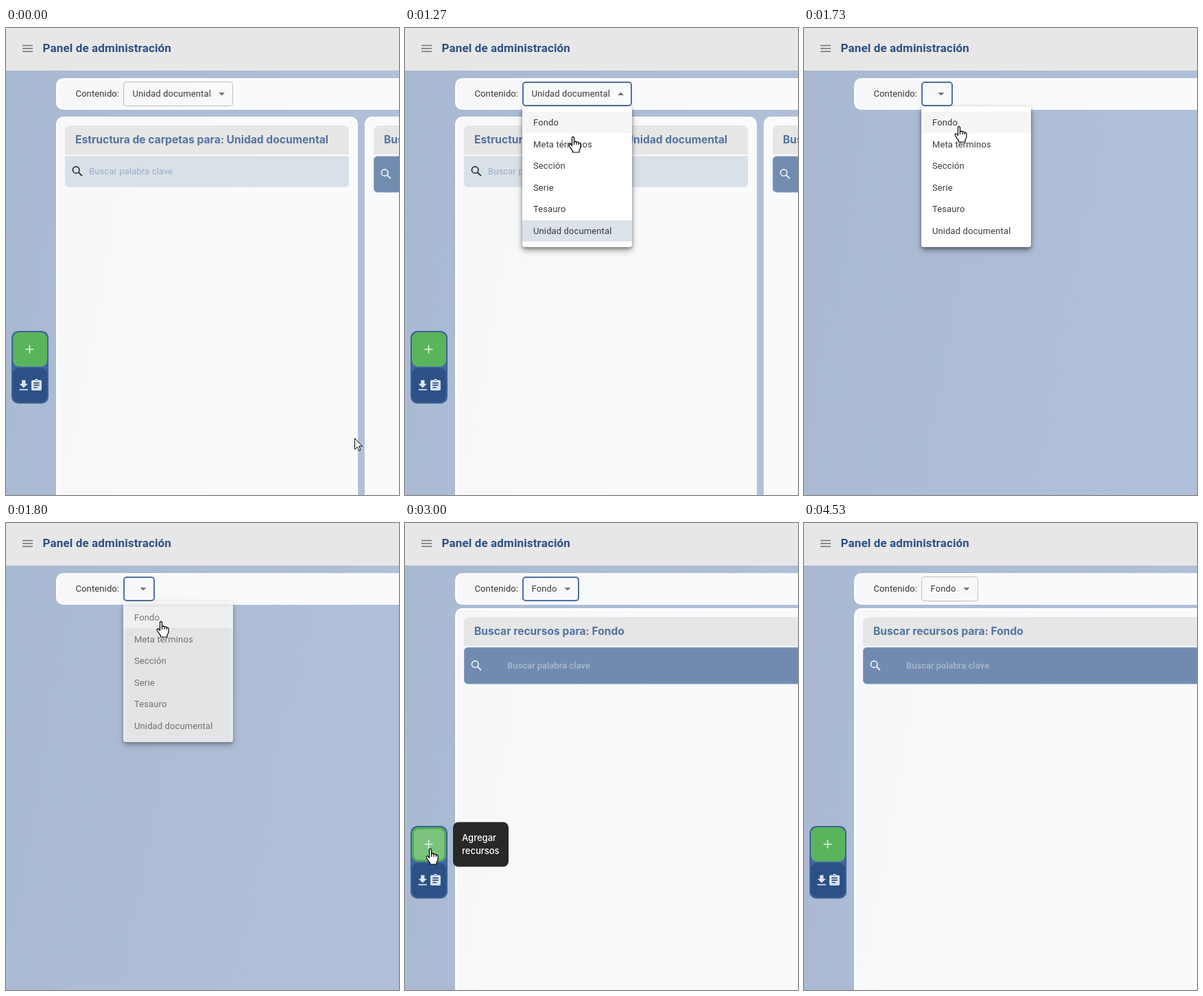
These frames come from a looping animation (573 by 680 pixels, 4870 ms). An HTML page with a canvas:

```html
<!DOCTYPE html>
<html lang="es">
<head>
<meta charset="utf-8">
<title>Panel de administración</title>
<style>
html, body { margin: 0; width: 573px; height: 680px; overflow: hidden; }
canvas { display: block; }
</style>
</head>
<body>
<canvas id="stage" width="573" height="680"></canvas>
<script>
const ctx = document.getElementById('stage').getContext('2d');
const W = 573, H = 680, LOOP = 4870, TICK = 1000 / 15;
const BLUE = '#4f719f', HEADING = '700 15.6px Inter, sans-serif', BODY = '13px Roboto, sans-serif';
const ITEMS = ['Fondo', 'Meta términos', 'Sección', 'Serie', 'Tesauro', 'Unidad documental'];
const ITEM_TOP = 122, ITEM_H = 31.5;

// Moments of the story, in ms
const HOVER_SELECT = 470, OPEN = 600, PICK = 1730, LOADED = 2000, HOVER_ADD = 2800, LEAVE_ADD = 4070, BLUR = 4530;

// Pointer: time, x, y
const TRAIL = [
  [0, 508, 597], [70, 500, 578], [200, 438, 430], [330, 340, 230], [470, 288, 116], [530, 283, 102],
  [1070, 283, 102], [1130, 278, 109], [1200, 262, 135], [1270, 245, 158], [1330, 240, 159],
  [1530, 226, 143], [1870, 226, 143], [2130, 200, 161], [2200, 172, 200], [2270, 132, 258],
  [2400, 86, 345], [2670, 44, 438], [2730, 41, 455], [2870, 38, 470], [3000, 37, 474],
  [3930, 37, 474], [4000, 36, 481], [4070, 42, 500], [4130, 62, 537], [4200, 98, 588],
  [4270, 145, 656], [4330, 180, 710]
];

const downloadIcon = new Path2D('M19 9h-4V3H9v6H5l7 7 7-7zM5 18v2h14v-2H5z');
const clipboardIcon = new Path2D('M19 3h-4.2C14.4 1.8 13.3 1 12 1s-2.4.8-2.8 2H5c-1.1 0-2 .9-2 2v14c0 1.1.9 2 2 2h14c1.1 0 2-.9 2-2V5c0-1.1-.9-2-2-2zm-7 0a1 1 0 0 1 0 2 1 1 0 0 1 0-2zm2 14H7v-2h7zm3-4H7v-2h10zm0-4H7V7h10z');
const arrowCursor = new Path2D('M.5 .5V16.5L4.2 13 6.8 18.6 9 17.6 6.6 12H11.5Z');
const handCursor = new Path2D('M-1.5 1.5Q0-.9 1.5 1.5V8Q3.6 6.4 5 8.2 7 7.2 8.3 9.2 11 8.6 11 11.5V15.5Q10.8 18 9 20V23H-.5V21Q-3 18-5.6 13.5-6.5 10.4-4 11-2.5 11.8-1.5 13.5Z');
const knuckles = new Path2D('M1.5 8V12M5 8.2V12M8.3 9.2V12');

const clamp = v => Math.max(0, Math.min(1, v));
const ease = v => 1 - (1 - clamp(v)) ** 2;

function sweep(x0, y0, x1, y1, from, to) {
  const g = ctx.createLinearGradient(x0, y0, x1, y1);
  g.addColorStop(0, from);
  g.addColorStop(1, to);
  return g;
}

function box(x, y, w, h, radius, fill, stroke, line = 1) {
  ctx.beginPath();
  ctx.roundRect(x, y, w, h, radius);
  if (fill) { ctx.fillStyle = fill; ctx.fill(); }
  if (stroke) { ctx.strokeStyle = stroke; ctx.lineWidth = line; ctx.stroke(); }
}

function label(str, x, y, color, font = BODY, spacing = 0.12) {
  ctx.font = font;
  ctx.letterSpacing = spacing + 'px';
  ctx.fillStyle = color;
  ctx.fillText(str, x, y);
}

function strokeLines(color, width, lines) {
  ctx.strokeStyle = color;
  ctx.lineWidth = width;
  ctx.beginPath();
  for (const [x0, y0, x1, y1] of lines) { ctx.moveTo(x0, y0); ctx.lineTo(x1, y1); }
  ctx.stroke();
}

function placed(x, y, scale, draw) {
  ctx.save();
  ctx.translate(x, y);
  ctx.scale(scale, scale);
  draw();
  ctx.restore();
}

function searchIcon(x, y, color) {
  placed(x, y, 0.86, () => {
    ctx.beginPath();
    ctx.arc(9.5, 9.5, 5.5, 0, 2 * Math.PI);
    ctx.strokeStyle = color;
    ctx.lineWidth = 2;
    ctx.stroke();
    strokeLines(color, 2.2, [[13.6, 13.6, 19.7, 19.7]]);
  });
}

function pointerAt(t) {
  const i = TRAIL.findIndex(p => p[0] > t);
  if (i < 0) return null;
  const [t0, x0, y0] = TRAIL[i - 1], [t1, x1, y1] = TRAIL[i];
  const k = (t - t0) / (t1 - t0);
  return { x: Math.round(x0 + (x1 - x0) * k), y: Math.round(y0 + (y1 - y0) * k) };
}

function panel(x, y, w, h) {
  box(x + 1.5, y + 1.5, w - 3, h - 3, 9, sweep(73, 100, 400, 160, '#f6f7f9', '#f9fafc'), '#fff', 3);
}

function backdrop() {
  ctx.fillStyle = sweep(0, 62, 560, 165, '#a9b9d2', '#b1c0d9');
  ctx.fillRect(0, 0, W, H);
  ctx.fillStyle = '#e7e7e7';
  ctx.fillRect(0, 0, W, 62);
  strokeLines('#707070', 1.5, [25.5, 29.8, 34.2].map(y => [24, y, 39, y]));
  label('Panel de administración', 53.5, 35, '#2c5085', '700 17px Roboto, sans-serif', 0.1275);
  panel(73, 73, 540, 46);
  label('Contenido:', 101.5, 100, '#333');
}

function selectBox(t) {
  const empty = t >= PICK && t < LOADED;
  const width = t < PICK ? 160 : empty ? 46 : 83;
  const open = t >= OPEN && t < PICK;
  const focused = t >= OPEN && t < BLUR;
  if (focused) box(172, 79, width - 2, 34, 4, null, BLUE, 2);
  else box(171.5, 78.5, width - 1, 35, 4, null, t >= HOVER_SELECT && t < OPEN ? '#333' : '#bdbec0');
  if (!empty) label(t < PICK ? ITEMS[5] : ITEMS[0], 184.5, 100, '#3a3a3a');
  const x = 171 + width - 17 + (t < PICK ? 0.5 : 0), dir = open ? -1 : 1;
  ctx.beginPath();
  ctx.moveTo(x - 4.5, 96 - 2 * dir);
  ctx.lineTo(x + 4.5, 96 - 2 * dir);
  ctx.lineTo(x, 96 + 2.5 * dir);
  ctx.fillStyle = '#757575';
  ctx.fill();
}

function heading(str, x, y, w) {
  box(x, y, w, 42, [8, 8, 0, 0], '#e6e6e6');
  label(str, x + 15, y + 26, '#5273a0', HEADING, 0);
}

function documentPanels() {
  panel(73, 129, 440, 600);
  heading('Estructura de carpetas para: Unidad documental', 86, 142, 414);
  box(86, 186.5, 414, 45, [3, 3, 5, 5], '#d8e0e8');
  searchIcon(94, 198.5, '#2b2f35');
  label('Buscar palabra clave', 121, 212.5, '#9dabc6');
  panel(523, 129, 200, 600);
  heading('Buscar recursos', 536, 142, 200);
  box(536.5, 187, 200, 52, 5, '#728cb0', '#8ba2c2');
  searchIcon(544, 202.5, '#f2f5f9');
}

function fondoPanel() {
  panel(73, 124, 540, 600);
  heading('Buscar recursos para: Fondo', 86, 137, 520);
  box(86.5, 181.5, 520, 52.5, 5, '#718bb0', '#7e97ba');
  searchIcon(94, 197.5, '#f2f5f9');
  label('Buscar palabra clave', 149, 211.5, '#a9b9d1', '500 13px Roboto, sans-serif', 0);
}

function actionButtons(hover) {
  box(9, 442, 52, 104, 9, '#4167a0', '#3e6199', 2);
  box(10, 443, 50, 50, 9, '#5ab45c');
  if (hover > 0) {
    ctx.globalAlpha = hover;
    box(11.5, 444.5, 47, 47, 8, '#7cc47e', '#52ad55', 3);
    ctx.globalAlpha = 1;
  }
  strokeLines('#e8f5e8', 1.6, [[28.5, 467.8, 40.5, 467.8], [34.5, 461.8, 34.5, 473.8]]);
  box(10, 495, 50, 50, 9, '#2c5186');
  ctx.fillStyle = '#dbe4f0';
  placed(15.2, 510, 0.88, () => ctx.fill(downloadIcon));
  placed(34.5, 510.2, 0.83, () => ctx.fill(clipboardIcon));
}

function tooltip(alpha) {
  if (alpha <= 0) return;
  ctx.globalAlpha = alpha;
  box(70, 435.5, 81, 65, 8, '#282828');
  label('Agregar', 83, 463, '#fff', '500 13px Inter, sans-serif', 0);
  label('recursos', 83, 482, '#fff', '500 13px Inter, sans-serif', 0);
  ctx.globalAlpha = 1;
}

function hoveredItem(t) {
  const p = pointerAt(t - 70);
  return t < 1200 ? -1 : Math.floor((p.y - ITEM_TOP) / ITEM_H);
}

function menu(t) {
  const shown = ease((t - OPEN + 60) / 300);
  const alpha = t < PICK ? shown : 1 - clamp((t - PICK) / 220);
  if (t < OPEN || alpha <= 0) return;
  const grow = 0.75 + 0.25 * shown;
  ctx.save();
  ctx.globalAlpha = alpha;
  ctx.translate(251, 114);
  ctx.scale(grow, grow * grow);
  ctx.translate(-251, -114);
  ctx.save();
  ctx.shadowColor = 'rgba(0,0,0,.32)';
  ctx.shadowBlur = 10;
  ctx.shadowOffsetY = 5;
  box(171, 114, 160, 205, 4, '#fff');
  ctx.shadowBlur = 4;
  ctx.shadowOffsetY = 2;
  box(171, 114, 160, 205, 4, '#fff');
  ctx.restore();
  const hovered = hoveredItem(t);
  ITEMS.forEach((item, i) => {
    const y = ITEM_TOP + i * ITEM_H;
    const selected = i === 5 && t < PICK;
    if (selected || i === hovered) {
      ctx.fillStyle = selected ? '#dce2ea' : '#f4f5f6';
      ctx.fillRect(171, Math.round(y), 160, 31);
    }
    label(item, 187, Math.round(y + 20), '#3a3a3a');
  });
  ctx.restore();
}

function cursor(t) {
  const p = pointerAt(t);
  if (!p) return;
  const over = (x0, y0, x1, y1) => p.x >= x0 && p.x <= x1 && p.y >= y0 && p.y <= y1;
  const onMenu = t >= OPEN && t < LOADED - 50 && over(171, 78, 331, 311);
  const hand = onMenu || over(171, 78, 331, 114) || over(10, 443, 60, 545);
  ctx.save();
  ctx.translate(p.x, p.y);
  ctx.fillStyle = '#fff';
  ctx.strokeStyle = '#000';
  ctx.lineWidth = hand ? 1.2 : 1;
  ctx.lineJoin = 'round';
  ctx.fill(hand ? handCursor : arrowCursor);
  ctx.stroke(hand ? handCursor : arrowCursor);
  if (hand) ctx.stroke(knuckles);
  ctx.restore();
}

function render(t) {
  backdrop();
  selectBox(t);
  if (t < PICK) documentPanels();
  if (t >= LOADED) fondoPanel();
  const leaving = clamp((t - LEAVE_ADD + 60) / 200);
  if (t < PICK || t >= LOADED) actionButtons(clamp((t - HOVER_ADD + 100) / 200) - leaving);
  tooltip(ease((t - HOVER_ADD) / 200) - leaving);
  menu(t);
  cursor(t);
}

function frame() {
  const now = performance.now() % LOOP;
  const step = Math.floor((now + 3.4) / TICK) % 73;
  render(Math.round(step * TICK / 10) * 10);
  requestAnimationFrame(frame);
}
frame();
</script>
</body>
</html>
```
